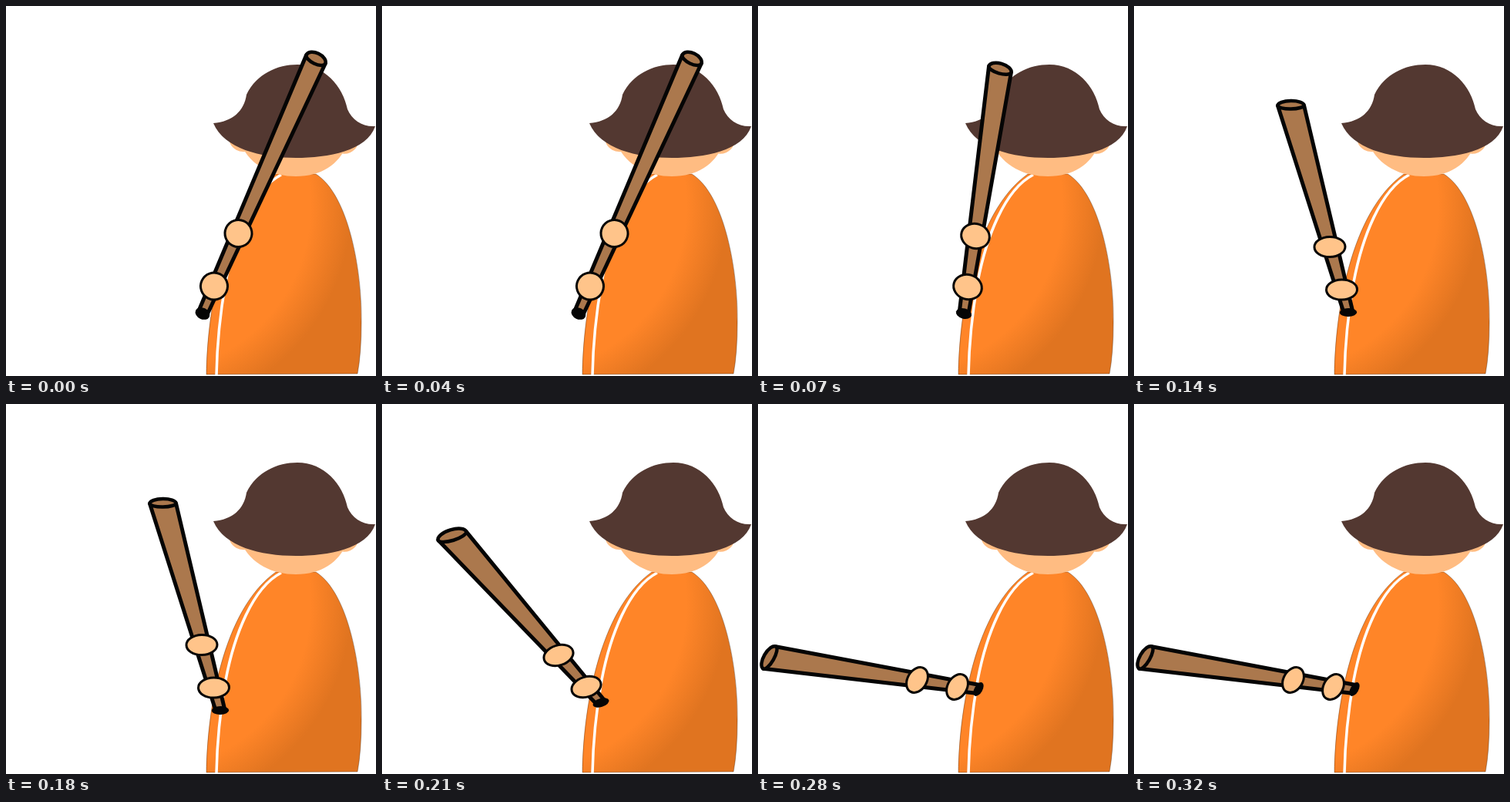
An HTML page with a canvas that plays this animation: 480 by 480 pixels, repeating every 0.35 s.

```html
<!DOCTYPE html>
<html lang="en">
<head>
<meta charset="utf-8">
<title>Batter</title>
<style>
  html, body { margin: 0; width: 100%; height: 100%; overflow: hidden; background: #fff; }
  canvas { display: block; width: 480px; height: 480px; }
</style>
</head>
<body>
<canvas id="stage" width="480" height="480"></canvas>
<script>
const ctx = document.getElementById('stage').getContext('2d');
const STEP = 70;
const SKIN = '#ffc48a', FACE = '#ffbc82', WOOD = '#ab784d', HAT = '#533831', INK = '#050505';
const EDGE = 'rgba(50, 20, 0, 0.35)';

// tip: x, y, rx, ry; hand: rx, ry; angle in degrees, shared by tip, hands and knob
const poses = [
  { tip: [402, 69, 13.5, 8], angle: 25, knob: [255, 399], hands: [[301.5, 295], [270, 363.5]], hand: [17.5, 17.5] },
  { tip: [314, 82, 15, 7.5], angle: 16, knob: [267, 399], hands: [[282, 298.5], [272, 364.5]], hand: [18.5, 16] },
  { tip: [203.5, 129, 17, 6], angle: -1, knob: [278, 397.5], hands: [[254, 312.5], [269.5, 368]], hand: [20, 13] },
  { tip: [91, 171, 19, 8], angle: -17, knob: [284, 387.5], hands: [[229, 326], [265, 367]], hand: [19.5, 13] },
  { tip: [15, 329, 16.5, 7.5], angle: -60, knob: [286, 370], hands: [[206.5, 358], [258.5, 367]], hand: [17.5, 12.5] }
];

function ellipse(x, y, rx, ry, angle, fill, lineWidth) {
  ctx.beginPath();
  ctx.ellipse(x, y, rx, ry, angle, 0, Math.PI * 2);
  paint(fill, lineWidth);
}

function paint(fill, lineWidth) {
  ctx.fillStyle = fill;
  ctx.fill();
  if (lineWidth) {
    ctx.strokeStyle = INK;
    ctx.lineWidth = lineWidth;
    ctx.stroke();
  }
}

function fillPath(d, fill, edge) {
  const path = new Path2D(d);
  ctx.fillStyle = fill;
  ctx.fill(path);
  if (edge) strokePath(path, edge, 1);
}

function strokePath(path, color, width) {
  ctx.strokeStyle = color;
  ctx.lineWidth = width;
  ctx.stroke(path);
}

const cloth = ctx.createRadialGradient(180, 260, 215, 180, 260, 268);
cloth.addColorStop(0, '#ff8528');
cloth.addColorStop(1, '#e07420');

function drawPlayer() {
  fillPath('M260 478C261 400 280 268 350 218L402 218C445 245 462 345 461 410Q461 450 456 477Z', cloth, EDGE);
  strokePath(new Path2D('M357 219C320 238 296 300 285 358Q274 420 273 479'), '#fff', 3.5);
  ellipse(304, 177, 15, 11, 0.5, FACE);
  ellipse(442, 180, 15, 11, -0.4, FACE);
  fillPath('M305 180C318 208 346 221 376 221C408 221 432 206 442 180Z', FACE);
  fillPath('M269 152C294 150 309 136 312 115C325 88 352 76 378 76C413 76 437 104 443 134' +
    'C449 148 462 157 479 156C468 188 418 197 376 197C330 197 283 185 269 152Z', HAT);
}

function drawTip([x, y, rx, ry], a) {
  ctx.beginPath();
  ctx.ellipse(x, y, rx, ry, a, Math.PI, Math.PI * 2);
  ctx.ellipse(x, y, rx, ry * 0.75, a, 0, Math.PI);
  paint(WOOD, 4.5);
}

function drawBat({ tip, angle, knob, hands, hand }) {
  const a = angle * Math.PI / 180;
  const edge = ([x, y], r) => [x + r * Math.cos(a), y + r * Math.sin(a)];
  ctx.lineJoin = 'round';
  ctx.beginPath();
  ctx.moveTo(...edge(tip, -tip[2]));
  ctx.lineTo(...edge(knob, -6));
  ctx.lineTo(...edge(knob, 6));
  ctx.lineTo(...edge(tip, tip[2]));
  ctx.closePath();
  paint(WOOD, 5);
  drawTip(tip, a);
  ellipse(...knob, hand[0] * 0.56, hand[1] * 0.42, a, INK);
  for (const center of hands) ellipse(...center, ...hand, a, SKIN, 3);
}

function render(now) {
  ctx.fillStyle = '#fff';
  ctx.fillRect(0, 0, 480, 480);
  drawPlayer();
  drawBat(poses[Math.floor(Math.max(0, now - start) / STEP) % poses.length]);
  requestAnimationFrame(render);
}

const start = performance.now();
render(start);
</script>
</body>
</html>
```
